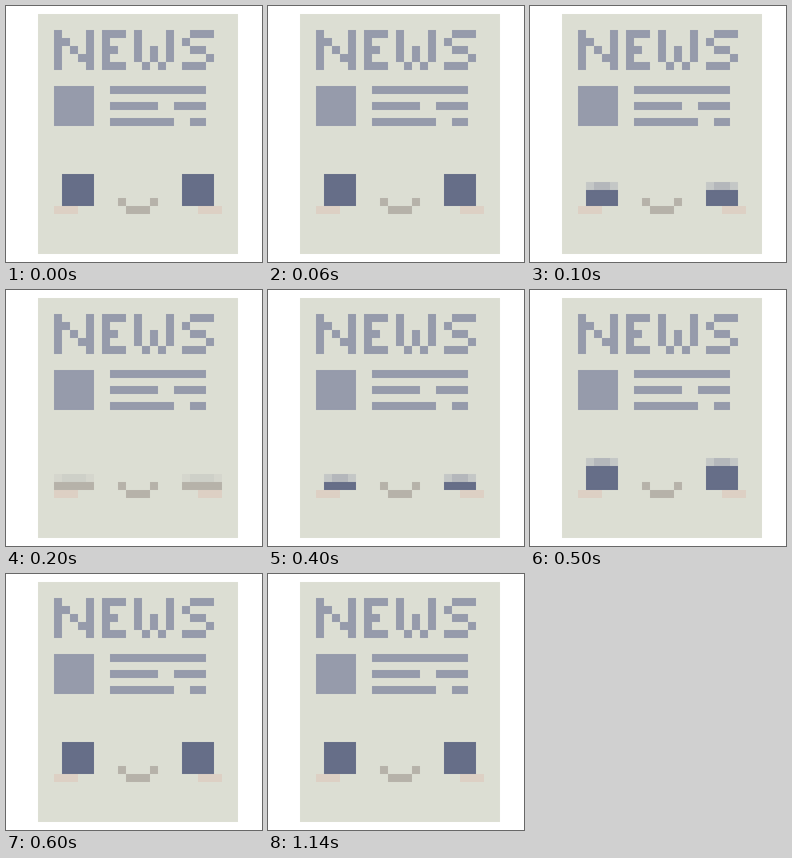
Write an HTML page that moves like this. It is 320 by 320 pixels and loops after 1.5 s.

```html
<!DOCTYPE html>
<html lang="en">
<head>
<meta charset="utf-8">
<title>Blinking newspaper</title>
<style>
  html, body { margin: 0; width: 100%; height: 100%; overflow: hidden; background: #fff; }
  svg { display: block; width: 100vw; height: 100vh; }
</style>
</head>
<body>
<svg viewBox="0 0 32 32" shape-rendering="crispEdges" role="img" aria-label="NEWS">
  <path id="paper" fill="#dcded3"/>
  <path id="print" fill="#969bab"/>
  <path id="blush" fill="#ddd0c4"/>
  <path id="mouth" fill="#b6b2a9"/>
  <g id="eyes"></g>
</svg>
<script>
const LOOP = 1500;
const COLORS = {
  eye: '#666e88', lid: '#b4b7bb', lidEdge: '#c4c7c6',
  closed: '#b6b2a9', crease: '#ced0c8', creaseEdge: '#d5d6cd'
};
const LETTERS = [
  '#...#.###.#...#..###',
  '##..#.#...#...#.#...',
  '#.#.#.##..#.#.#..##.',
  '#..##.#...#.#.#....#',
  '#...#.###..#.#..###.'
];

const $ = id => document.getElementById(id);
const box = (x, y, w, h = 1) => `M${x} ${y}h${w}v${h}h${-w}z`;
const shape = (color, d) => `<path fill="${color}" d="${d}"/>`;
const draw = (id, ...boxes) => $(id).setAttribute('d', boxes.join(''));

const title = LETTERS.flatMap((row, y) =>
  [...row].map((cell, x) => cell === '#' ? box(6 + x, 3 + y, 1) : ''));

draw('paper', box(4, 1, 25, 30));
draw('print', ...title, box(6, 10, 5, 5),
  box(13, 10, 12),
  box(13, 12, 6), box(21, 12, 4),
  box(13, 14, 8), box(23, 14, 2));
draw('blush', box(6, 25, 3), box(24, 25, 3));
draw('mouth', box(14, 24, 1), box(15, 25, 3), box(18, 24, 1));

// A strip one cell high whose end cells are paler than its middle.
const strip = (x, y, w, edge, middle) =>
  shape(edge, box(x, y, w)) + shape(middle, box(x + 1, y, w - 2));

// drop: rows the eyelid has come down, 0 = open, 4 = closed
function eye(x, drop) {
  if (drop === 4) {
    const left = x < 16 ? x - 1 : x;
    return strip(left, 23, 5, COLORS.creaseEdge, COLORS.crease) +
      shape(COLORS.closed, box(left, 24, 5));
  }
  const top = 21 + drop;
  const lid = drop ? strip(x, top - 1, 4, COLORS.lidEdge, COLORS.lid) : '';
  return lid + shape(COLORS.eye, box(x, top, 4, 4 - drop));
}

function lidDrop(t) {
  if (t < 100) return 0;
  if (t < 200) return 2;
  if (t < 400) return 4;
  if (t < 500) return 3;
  return t < 600 ? 1 : 0;
}

let shown = -1;
function render(time) {
  const drop = lidDrop(time % LOOP);
  if (drop !== shown) {
    $('eyes').innerHTML = eye(7, drop) + eye(22, drop);
    shown = drop;
  }
}

const start = performance.now();
function tick() {
  render(performance.now() - start);
  requestAnimationFrame(tick);
}
tick();
</script>
</body>
</html>
```
